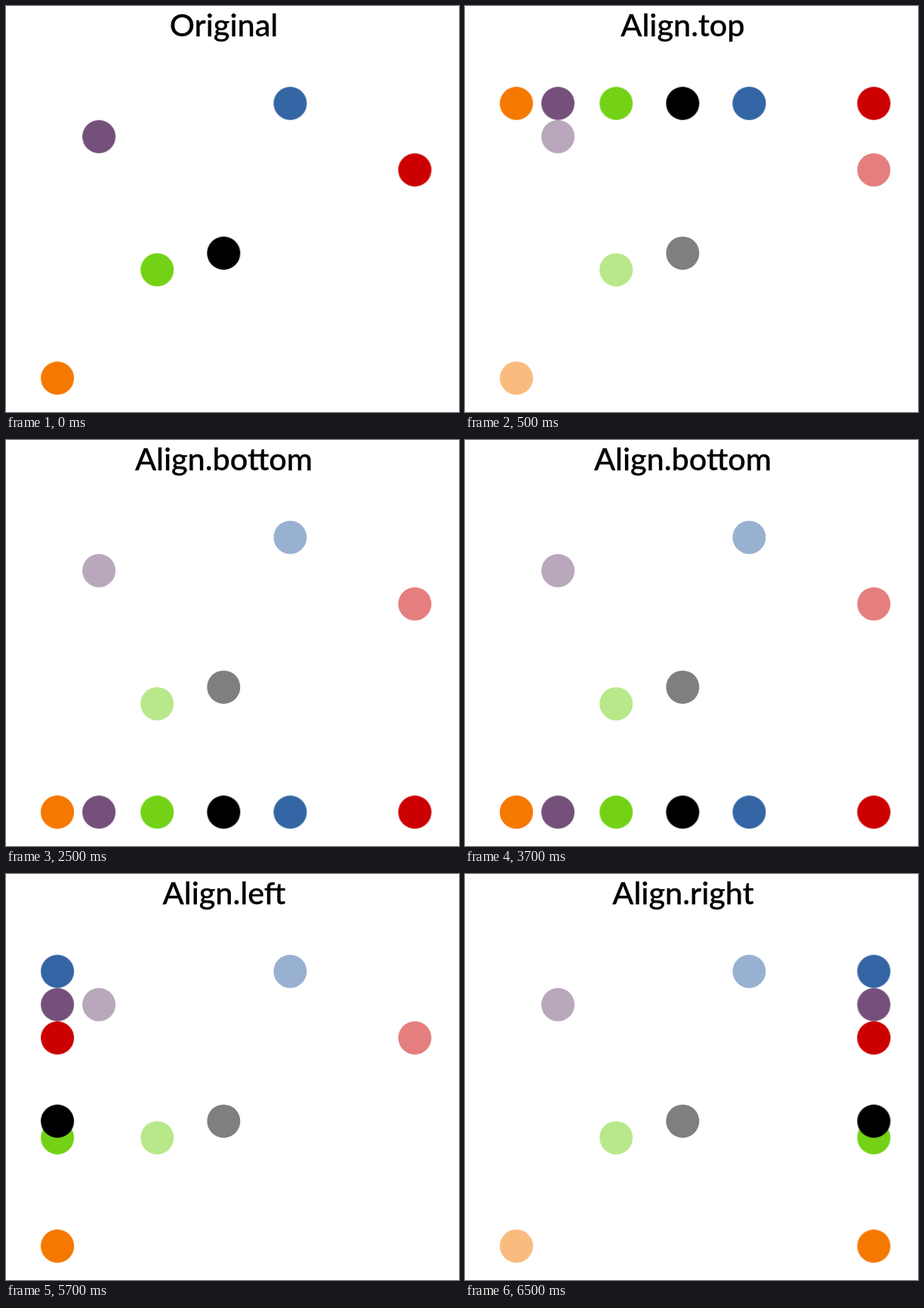
An HTML page that plays this animation: 600x537 px, repeating every 8 s.

```html
<!DOCTYPE html>
<html lang="en">
<head>
<meta charset="utf-8">
<title>Align</title>
<style>
  html, body { margin: 0; width: 100%; height: 100%; overflow: hidden; background: #fff; }
  svg { display: block; width: 100%; height: 100%; overflow: hidden; }
  :root { --top: 128.8px; --bottom: 492.2px; --left: 68.1px; --right: 541.5px; }

  text {
    font: 500 41.4px Lato, "Open Sans", sans-serif;
    text-anchor: middle;
    stroke: #000;
    stroke-width: .3px;
  }

  /* Titles sit 600px apart; the column jumps to the current one */
  .titles { animation: title 8s step-end infinite; }
  @keyframes title {
    0% { transform: translateY(0); }
    6.25% { transform: translateY(-600px); }
    31.25% { transform: translateY(-1200px); }
    56.25% { transform: translateY(-1800px); }
    81.25%, 100% { transform: translateY(-2400px); }
  }

  .dot { transform: translate(var(--x), var(--y)); }
  .ghosts { animation: ghost 8s step-end infinite; }
  .ghosts .dot { opacity: .5; }
  @keyframes ghost {
    0% { visibility: hidden; }
    6.25%, 100% { visibility: visible; }
  }

  .dots .dot { animation: align 8s step-end infinite; }
  @keyframes align {
    0% { transform: translate(var(--x), var(--y)); }
    6.25% { transform: translate(var(--x), var(--top)); }
    31.25% { transform: translate(var(--x), var(--bottom)); }
    56.25% { transform: translate(var(--left), var(--y)); }
    81.25%, 100% { transform: translate(var(--right), var(--y)); }
  }

  .orange { --x: 68.1px; --y: 492.2px; fill: #f57900; }
  .purple { --x: 123.1px; --y: 172.8px; fill: #75507b; }
  .green { --x: 200.2px; --y: 348.9px; fill: #73d216; }
  .blue { --x: 376.4px; --y: 128.8px; fill: #3465a4; }
  .red { --x: 541.5px; --y: 216.8px; fill: #c00; }
  .black { --x: 288.3px; --y: 326.9px; fill: #000; }
</style>
</head>
<body>
<svg viewBox="0 0 600 537">
  <g class="titles">
    <text x="288.5" y="40">Original</text>
    <text x="288.5" y="640">Align.top</text>
    <text x="288.5" y="1240">Align.bottom</text>
    <text x="289" y="1840">Align.left</text>
    <text x="289" y="2440">Align.right</text>
  </g>
  <g class="ghosts">
    <circle class="dot orange" r="22"/>
    <circle class="dot purple" r="22"/>
    <circle class="dot green" r="22"/>
    <circle class="dot blue" r="22"/>
    <circle class="dot red" r="22"/>
    <circle class="dot black" r="22"/>
  </g>
  <g class="dots">
    <circle class="dot orange" r="22"/>
    <circle class="dot purple" r="22"/>
    <circle class="dot green" r="22"/>
    <circle class="dot blue" r="22"/>
    <circle class="dot red" r="22"/>
    <circle class="dot black" r="22"/>
  </g>
</svg>
</body>
</html>
```
